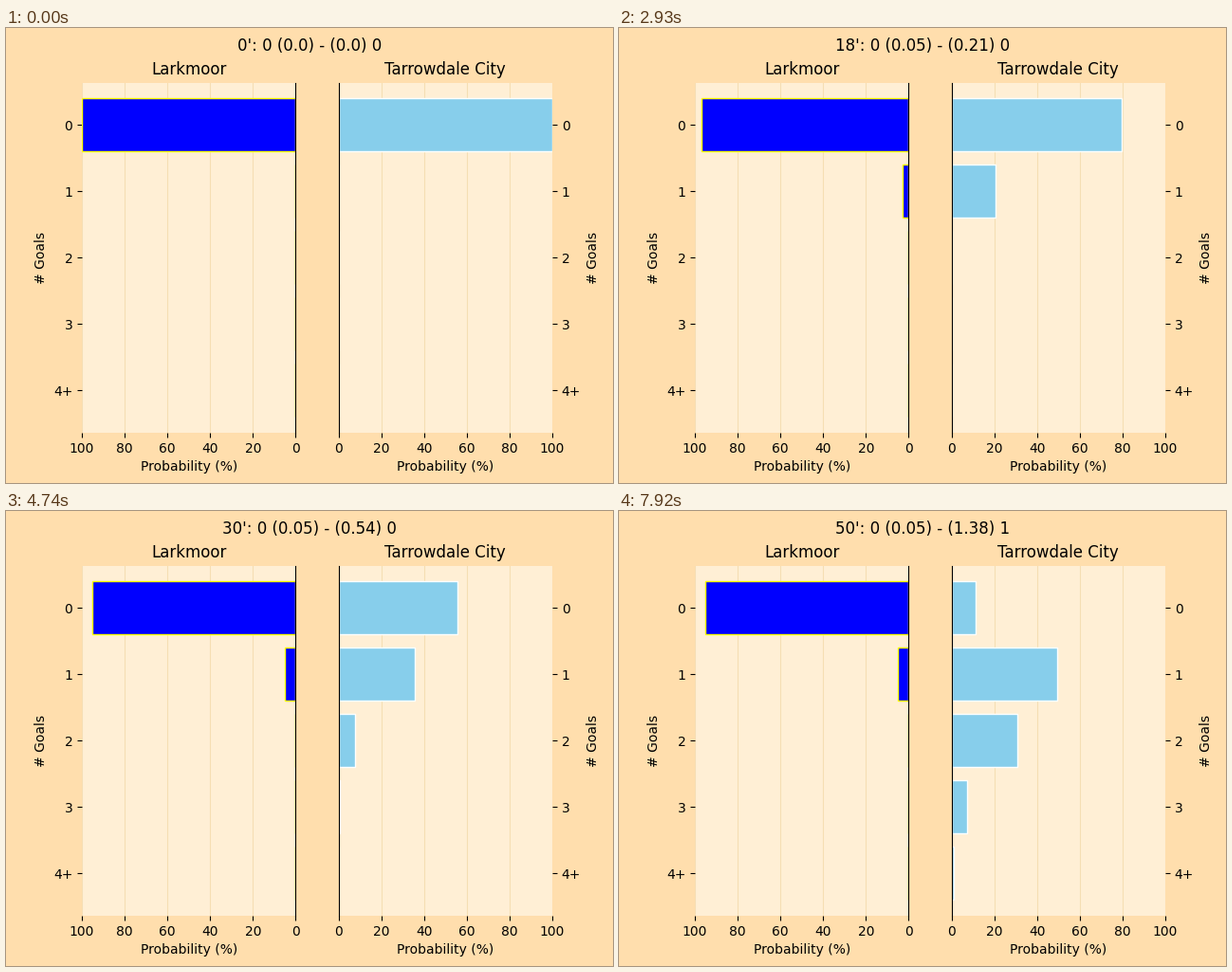
A matplotlib script that plays this animation: 640x480 px, repeating every 8 s.

```python
import matplotlib.pyplot as plt
import numpy as np
from matplotlib.animation import FuncAnimation

LOOP, STEP = 8000, 20            # ms
HOLD, TWEEN, SUB = 160, 30, 5    # plain minute; pieces of a minute with a shot
LAST = 50
TEAMS = ["Larkmoor", "Tarrowdale City"]
SHOTS = {8: (1, 0.206), 18: (0, 0.049), 23: (1, 0.06), 24: (1, 0.04),
         26: (1, 0.19), 27: (1, 0.04), 34: (1, 0.79), 42: (1, 0.05)}
GOALS = {34: 1}                  # minute: scoring team


def add_shot(dist, p):
    """Goal distribution after one more chance; the last bin is open-ended."""
    new = dist * (1 - p)
    new[1:] += dist[:-1] * p
    new[-1] += dist[-1] * p
    return new


def build_timeline():
    """List of (start time, title, bar lengths of both teams)."""
    states, t = [], 0
    dist = np.zeros((2, 5))
    dist[:, 0] = 1
    xg, score = [0.0, 0.0], [0, 0]
    for minute in range(LAST + 1):
        if minute in GOALS:
            score[GOALS[minute]] += 1
        old = dist.copy()
        if minute in SHOTS:
            team, p = SHOTS[minute]
            xg[team] += p
            dist[team] = add_shot(dist[team], p)
        title = (f"{minute}': {score[0]} ({round(xg[0], 2)})"
                 f" - ({round(xg[1], 2)}) {score[1]}")
        if minute in SHOTS:
            for k in range(1, SUB + 1):
                states.append((t, title, old + (dist - old) * k / SUB))
                t += TWEEN
        else:
            states.append((t, title, dist.copy()))
            t += HOLD
    return states


def style(ax, name, inner):
    ax.set_facecolor("papayawhip")
    ax.set_title(name)
    ax.set_xlabel("Probability (%)")
    ax.set_ylabel("# Goals")
    ax.set_xticks(range(0, 101, 20))
    ax.set_yticks(range(5), ["0", "1", "2", "3", "4+"])
    ax.set_ylim(4.64, -0.64)
    ax.set_axisbelow(True)
    ax.grid(axis="x", color="wheat")
    for side, spine in ax.spines.items():
        spine.set_visible(side == inner)


fig, axes = plt.subplots(1, 2, figsize=(6.4, 4.8), dpi=100,
                         facecolor="navajowhite")
style(axes[0], TEAMS[0], "right")
style(axes[1], TEAMS[1], "left")
axes[0].set_xlim(100, 0)
axes[1].set_xlim(0, 100)
axes[1].yaxis.tick_right()
axes[1].yaxis.set_label_position("right")

bars = [ax.barh(range(5), [0] * 5, color=fill, edgecolor=edge)
        for ax, fill, edge in zip(axes, ("blue", "skyblue"),
                                  ("yellow", "white"))]
heading = fig.suptitle("")

timeline = build_timeline()
starts = [state[0] for state in timeline]


def update(i):
    t = i * STEP + STEP / 2
    _, title, dist = timeline[np.searchsorted(starts, t, side="right") - 1]
    heading.set_text(title)
    for group, probs in zip(bars, dist):
        for bar, p in zip(group, probs):
            bar.set_width(100 * p)
    return [heading, *bars[0], *bars[1]]


anim = FuncAnimation(fig, update, frames=LOOP // STEP, interval=STEP,
                     init_func=lambda: update(0), repeat=True, repeat_delay=0)
plt.show()
```
